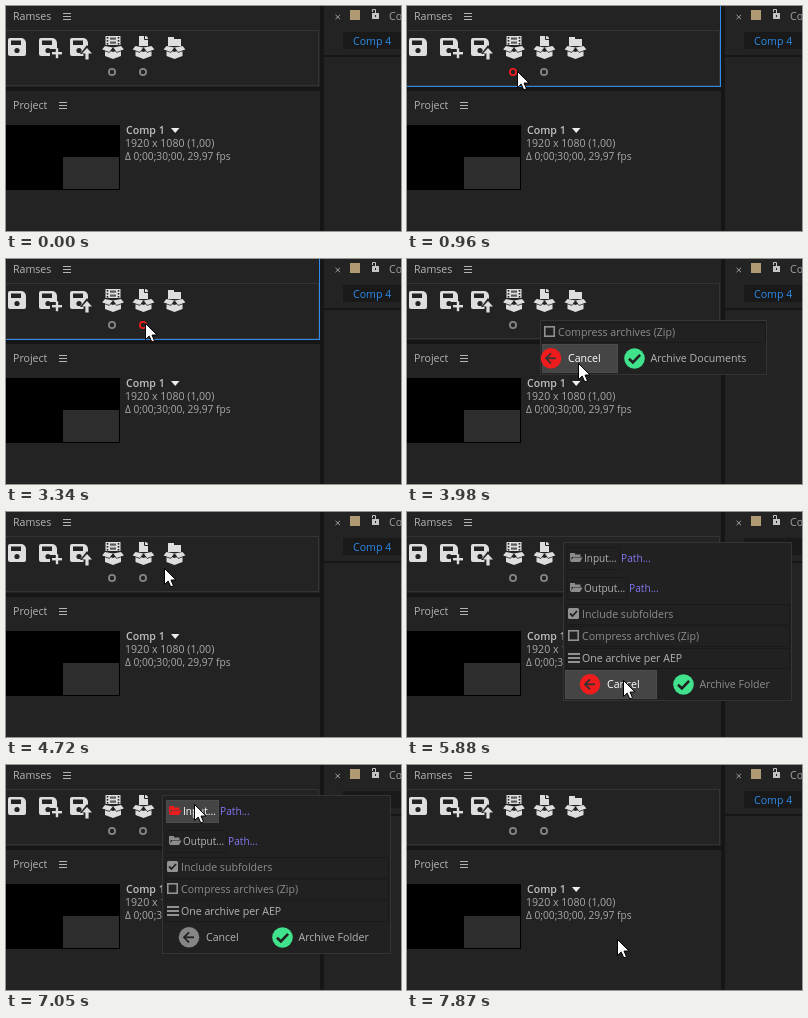
Animation of 395 by 225 pixels, one loop 7.92 s. Source, as an HTML page with a canvas:

```html
<!DOCTYPE html>
<html lang="en">
<head>
<meta charset="utf-8">
<title>Archive panel</title>
<style>
html, body { margin: 0; width: 100%; height: 100%; overflow: hidden; background: #232323; }
canvas { display: block; width: 395px; height: 225px; }
</style>
</head>
<body>
<canvas id="stage"></canvas>
<script>
const W = 395, H = 225, LOOP = 7920;
const BG = '#232323', FACE = '#212121', GAP = '#161616', EDGE = '#343434', HOVER = '#454545';
const ICON = '#dedede', MARK = '#929292', RED = '#ee1c1c', GREEN = '#40e38c', BLUE = '#2d8ceb';
const TEXT = '#b4b4b4', DIM = '#8c8c8c', LINK = '#8078f0';

const canvas = document.getElementById('stage');
const ratio = window.devicePixelRatio || 1;
canvas.width = W * ratio;
canvas.height = H * ratio;
const ctx = canvas.getContext('2d');
ctx.scale(ratio, ratio);

const spot = (x, y) => ({ x, y });
const entry = spot(244, 212);
const compRing = spot(111, 66), itemRing = spot(140, 65), folderIcon = spot(166, 39);
const cancelSmall = spot(185, 100), cancelLarge = spot(217, 169), inputButton = spot(189, 40);

// The pointer eases to each spot and rests there until the next move.
const moves = [
  { from: 40, to: 730, at: compRing },
  { from: 2170, to: 2310, at: spot(157, 59) },
  { from: 2450, to: 2630, at: spot(273, 31) },
  { from: 2830, to: 3300, at: itemRing },
  { from: 3700, to: 4080, at: spot(179, 113) },
  { from: 4080, to: 4350, at: cancelSmall },
  { from: 4490, to: 4720, at: spot(159, 57) },
  { from: 4720, to: 4960, at: folderIcon },
  { from: 5440, to: 5880, at: cancelLarge },
  { from: 5910, to: 6260, at: spot(300, 183) },
  { from: 6310, to: 6850, at: inputButton },
  { from: 7050, to: 7410, at: spot(211, 175) }
];

const popups = [
  { from: 1560, to: 2870, live: 2170, draw: o => archivePopup(102, 'Archive Compositions', o) },
  { from: 3560, to: 4530, live: 3700, draw: o => archivePopup(133, 'Archive Documents', o) },
  { from: 5200, to: 7700, live: 5460, draw: folderPopup }
];

const within = (t, a, b) => t >= a && t < b;

function pointerAt(t) {
  if (t < moves[0].from) return null;
  let { x, y } = entry;
  for (const { from, to, at } of moves) {
    const k = Math.min(1, Math.max(0, (t - from) / (to - from)));
    const ease = k * k * (3 - 2 * k);
    x += (at.x - x) * ease;
    y += (at.y - y) * ease;
  }
  return spot(Math.round(x), Math.round(y));
}

function rect(x, y, w, h, color) {
  ctx.fillStyle = color;
  ctx.fillRect(x, y, w, h);
}

function roundRect(x, y, w, h, r, color) {
  ctx.beginPath();
  ctx.roundRect(x, y, w, h, r);
  ctx.fillStyle = color;
  ctx.fill();
}

function frame(x, y, w, h, color, width = 1) {
  ctx.strokeStyle = color;
  ctx.lineWidth = width;
  ctx.strokeRect(x + width / 2, y + width / 2, w - width, h - width);
}

function trace(pts) {
  ctx.beginPath();
  for (let i = 0; i < pts.length; i += 2) ctx.lineTo(pts[i], pts[i + 1]);
}

function poly(color, ...pts) {
  trace(pts);
  ctx.fillStyle = color;
  ctx.fill();
}

function line(color, width, ...pts) {
  trace(pts);
  ctx.strokeStyle = color;
  ctx.lineWidth = width;
  ctx.stroke();
}

function disc(x, y, r, color) {
  ctx.beginPath();
  ctx.arc(x, y, r, 0, 2 * Math.PI);
  ctx.fillStyle = color;
  ctx.fill();
}

function ring(x, y, color) {
  ctx.beginPath();
  ctx.arc(x, y, 3.1, 0, 2 * Math.PI);
  ctx.strokeStyle = color;
  ctx.lineWidth = 1.8;
  ctx.stroke();
}

function text(str, x, y, color = TEXT, size = 10.6, weight = 400) {
  ctx.font = `${weight} ${size}px "Open Sans", "Noto Sans", sans-serif`;
  ctx.fillStyle = color;
  ctx.fillText(str, x, y);
}

function bars(x, y, w, step, h, color) {
  for (let i = 0; i < 3; i++) rect(x, y + i * step, w, h, color);
}

function floppy(x) {
  roundRect(x, 32, 18, 18, [2, 5, 2, 2], ICON);
  rect(x + 3, 34.5, 10, 4.5, BG);
  disc(x + 9, 44.5, 2.6, BG);
}

function openBox(x, color) {
  poly(color, x - 8, 43, x, 46, x + 8, 43, x + 8, 50, x, 53, x - 8, 50);
  for (const side of [-1, 1]) {
    const at = d => x + side * d;
    poly(color, at(8), 40, at(0), 41.5, at(3.5), 46, at(11), 43.5);
    line(BG, .8, at(0), 42, at(3.5), 46.4, at(11), 44);
  }
}

function folder(x, y, color) {
  rect(x, y, 5, 2, color);
  rect(x, y + 1.5, 10.5, 2.5, color);
  rect(x, y + 2, 1.5, 6, color);
  poly(color, x + 3, y + 4.5, x + 12.5, y + 4.5, x + 10, y + 9, x + .5, y + 9);
}

function film(x, y) {
  rect(x, y, 15, 9, ICON);
  for (let i = 0; i < 3; i++) {
    for (const dx of [1.2, 12.2]) rect(x + dx, y + 1 + i * 3, 1.6, 1.6, BG);
  }
  for (const dy of [1.5, 5.5]) rect(x + 4.5, y + dy, 6, 2.2, '#5a5a5a');
}

function toolbar(t) {
  for (let i = 0; i < 3; i++) floppy(2 + i * 31);

  rect(44, 43, 13, 9, BG);
  rect(46, 46, 10, 2.4, ICON);
  rect(49.8, 42.2, 2.4, 10, ICON);

  poly(BG, 81, 39, 88, 48, 74, 48);
  rect(77.5, 46, 7, 8, BG);
  poly(ICON, 81, 42, 86, 47.5, 76, 47.5);
  rect(79.4, 47, 3.2, 6.5, ICON);

  film(99.5, 30);
  openBox(107, ICON);

  roundRect(133, 30, 9, 10, [0, 3, 0, 0], ICON);
  line(BG, 1, 138.5, 30, 138.5, 33.5, 142, 33.5);
  openBox(137.5, ICON);

  const hot = within(t, 4860, 5200) ? RED : ICON;
  rect(162, 31, 6, 4, hot);
  rect(162, 33, 13, 7, hot);
  openBox(168.5, hot);

  ring(106, 66, within(t, 910, 1560) ? RED : '#858585');
  ring(137, 66, within(t, 3260, 3560) ? RED : '#858585');
}

function compTab() {
  for (const dir of [-1, 1]) line('#a0a0a0', 1, 329.5, 11 - dir * 2.2, 334, 11 + dir * 2.2);
  rect(344, 4, 10, 10, '#b09a73');
  rect(366, 7, 7, 6, '#c4c4c4');
  rect(369, 9, 1, 2, BG);
  line('#c4c4c4', 1, 366.5, 6, 366.5, 3.5, 369.5, 3.5, 369.5, 7);
  text('Comp', 383, 14, '#a0a0a0');
  rect(337, 26, 58, 17, '#191919');
  text('Comp 4', 347, 39, BLUE);
  rect(318, 49, 77, 2, GAP);
}

function workspace(t) {
  rect(0, 0, W, H, BG);
  rect(0, 81, 314, 4, GAP);
  rect(314, 0, 4, H, GAP);
  frame(-1, 24, 314, 56, EDGE);
  text('Ramses', 7, 14);
  bars(57, 7, 8, 3, 1, TEXT);
  toolbar(t);
  const focused = within(t, 910, 1560) || within(t, 2830, 3560) || within(t, 5140, 5200);
  if (focused) frame(-1, -1, 315, 82, BLUE);

  text('Project', 7, 103);
  bars(53, 96, 8, 3, 1, TEXT);
  rect(0, 119, 114, 65, '#000');
  rect(57, 151, 56, 32, '#2d2d2d');
  text('Comp 1', 120, 128, '#c0c0c0', 10.6, 600);
  poly('#eee', 165, 122, 173.5, 122, 169.2, 127);
  text('1920 x 1080 (1,00)', 119, 141, '#a8a8a8');
  text('Δ 0;00;30;00, 29,97 fps', 119, 153.5, '#a8a8a8', 10.2);
  compTab();
}

function panel(x, y, w, h) {
  rect(x, y, w, h, FACE);
  frame(x, y, w, h, EDGE);
}

// Fills a clickable area and tells whether the pointer is on it.
function area(o, x, y, w, h, edge = FACE) {
  const on = o && o.x >= x && o.x < x + w && o.y >= y && o.y < y + h;
  rect(x, y, w, h, on ? HOVER : FACE);
  frame(x, y, w, h, on ? '#4c4c4c' : edge);
  return on;
}

function checkRow(o, x, y, label, checked) {
  area(o, x, y, 224, 21, '#1a1a1a');
  const left = x + 2, top = y + 4;
  if (checked) {
    roundRect(left, top, 11, 11, 1.5, MARK);
    line(FACE, 1.8, left + 2, top + 5.5, left + 4.5, top + 8, left + 9, top + 3);
  } else {
    frame(left, top, 11, 11, MARK, 1.6);
  }
  text(label, x + 16, y + 14, DIM);
}

function pathButton(o, y, w, label) {
  const on = area(o, 160, y, w, 23, '#1b1b1b');
  folder(163, y + 6, on ? RED : DIM);
  text(label, 177, y + 15, on ? '#fff' : TEXT, 10);
  text('Path...', 161 + w, y + 15, LINK, 10.2);
}

function cancelButton(o, x, y, w) {
  const on = area(o, x, y, w, 29);
  const cx = x + w - 67, cy = y + 14.3, ink = on ? '#333' : FACE;
  disc(cx, cy, 10.3, on ? RED : '#858585');
  line(ink, 1.8, cx + 5, cy, cx - 4.5, cy);
  line(ink, 1.8, cx, cy - 5, cx - 5, cy, cx, cy + 5);
  text('Cancel', cx + 17, y + 18, on ? '#fff' : TEXT);
}

function archiveButton(o, x, y, w, label, inset, color = TEXT) {
  const on = area(o, x, y, w, 29);
  const cx = x + inset, cy = y + 14.5;
  disc(cx, cy, 10.3, GREEN);
  line(FACE, 2.6, cx - 5.5, cy + .2, cx - 1.6, cy + 4, cx + 5.6, cy - 3.6);
  text(label, cx + 16, y + 18, on ? '#fff' : color);
}

function archivePopup(x, label, o) {
  panel(x, 61, 227, 55);
  checkRow(o, x + 2, 63, 'Compress archives (Zip)', false);
  cancelButton(o, x + 2, 85, 76);
  archiveButton(o, x + 78, 85, 147, label, 16.5);
}

function folderPopup(o, t) {
  panel(156, 30, 229, 159);
  pathButton(o, 35, 53, 'Input...');
  pathButton(o, 65, 61, 'Output...');
  checkRow(o, 159, 92, 'Include subfolders', true);
  checkRow(o, 159, 114, 'Compress archives (Zip)', false);
  area(o, 159, 136, 224, 21, '#1a1a1a');
  bars(161, 141, 12, 4, 2, MARK);
  text('One archive per AEP', 175, 150);
  cancelButton(o, 158, 158, 92);
  archiveButton(o, 250, 158, 133, 'Archive Folder', 26.5, t < 6000 ? DIM : TEXT);
}

function arrow({ x, y }) {
  ctx.save();
  ctx.translate(x - .5, y - .5);
  trace([0, 0, 0, 16, 3.7, 12.6, 6.3, 18.4, 9, 17.2, 6.5, 11.6, 11.5, 11.4]);
  ctx.closePath();
  ctx.fillStyle = '#fff';
  ctx.fill();
  ctx.strokeStyle = '#000';
  ctx.lineWidth = 1;
  ctx.stroke();
  ctx.restore();
}

function draw(t) {
  const pointer = pointerAt(t);
  workspace(t);
  const open = popups.find(p => within(t, p.from, p.to));
  if (open) open.draw(t >= open.live ? pointer : null, t);
  if (pointer) arrow(pointer);
}

let start;
function tick(now) {
  start ??= now;
  draw((now - start) % LOOP);
  requestAnimationFrame(tick);
}
draw(0);
requestAnimationFrame(tick);
</script>
</body>
</html>
```
